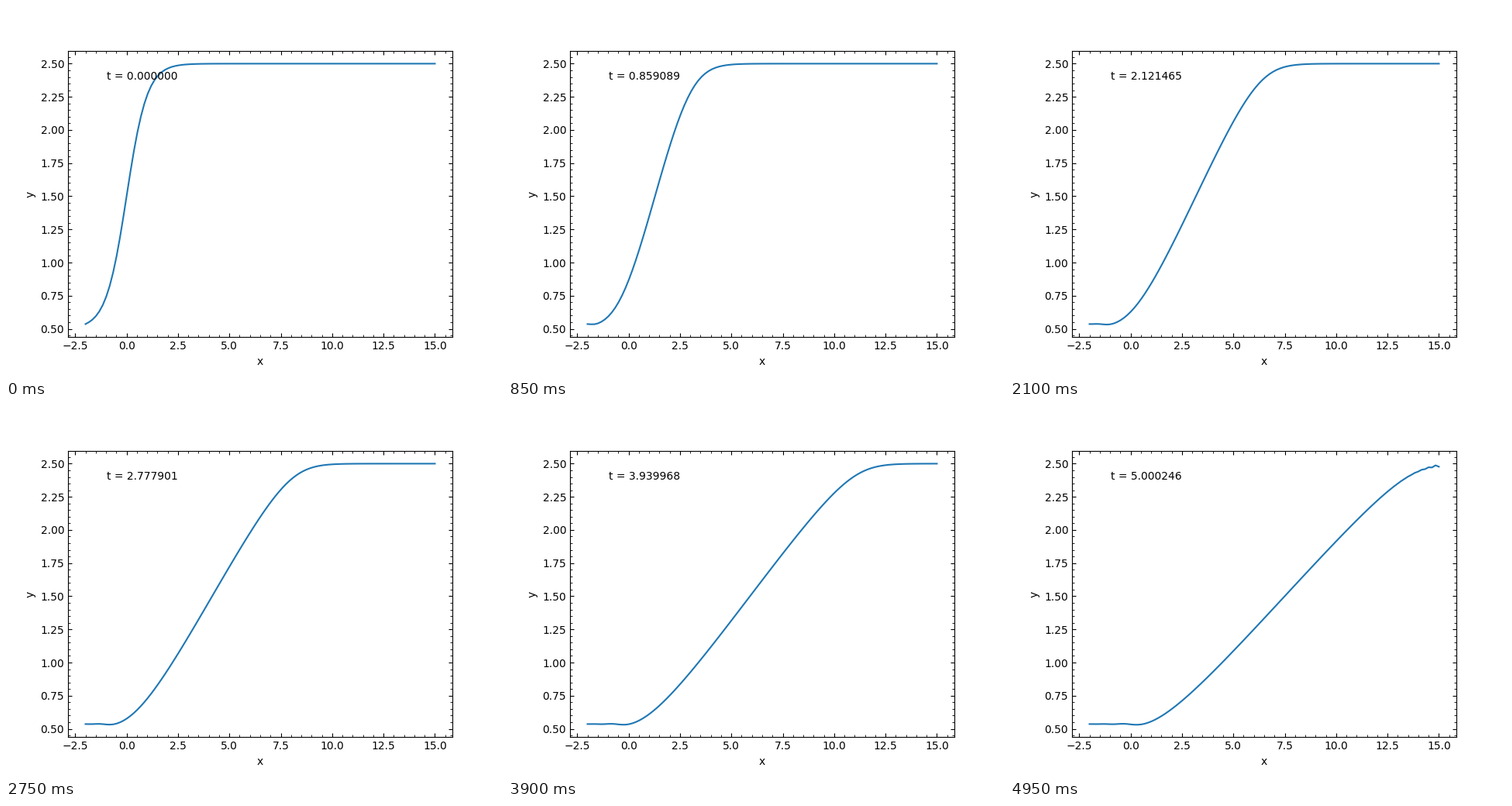
These frames come from a looping animation (640 by 480 pixels, 5000 ms). A matplotlib script:

```python
import numpy as np
import matplotlib.pyplot as plt
from matplotlib.animation import FuncAnimation

FRAMES, INTERVAL = 100, 50
T_END = 5.0
CFL = 0.01

plt.rcParams.update({
    "font.family": "DejaVu Sans",
    "xtick.direction": "in", "ytick.direction": "in",
    "xtick.top": True, "ytick.right": True,
    "xtick.minor.visible": True, "ytick.minor.visible": True,
})

x = np.linspace(-2, 15, 102)
dx = x[1] - x[0]


def start_profile():
    return 1.5 + np.tanh(x)


def solve():
    """Burgers' equation, centred fluxes, state kept at each output time."""
    u = start_profile()
    right = u[-1]
    t, states = 0.0, []
    for goal in np.linspace(0, T_END, FRAMES):
        while t < goal:
            dt = CFL * dx / np.abs(u).max()
            flux = 0.5 * np.append(u, right) ** 2
            # the inflow value u[0] stays fixed
            u[1:] -= dt / (2 * dx) * (flux[2:] - flux[:-2])
            t += dt
        states.append((t, u.copy()))
    return states


states = solve()

fig, ax = plt.subplots(figsize=(6.4, 4.8), dpi=100)
line, = ax.plot(x, start_profile(), color="#1f77b4", lw=1.5)
clock = ax.text(0.1, 0.9, "", transform=ax.transAxes)
ax.set_xlabel("x")
ax.set_ylabel("y")


def draw(i):
    t, u = states[i]
    line.set_ydata(u)
    clock.set_text(f"t = {t:.6f}")
    return line, clock


anim = FuncAnimation(fig, draw, frames=FRAMES, interval=INTERVAL,
                     init_func=lambda: draw(0), repeat=True, repeat_delay=0)
plt.show()
```
